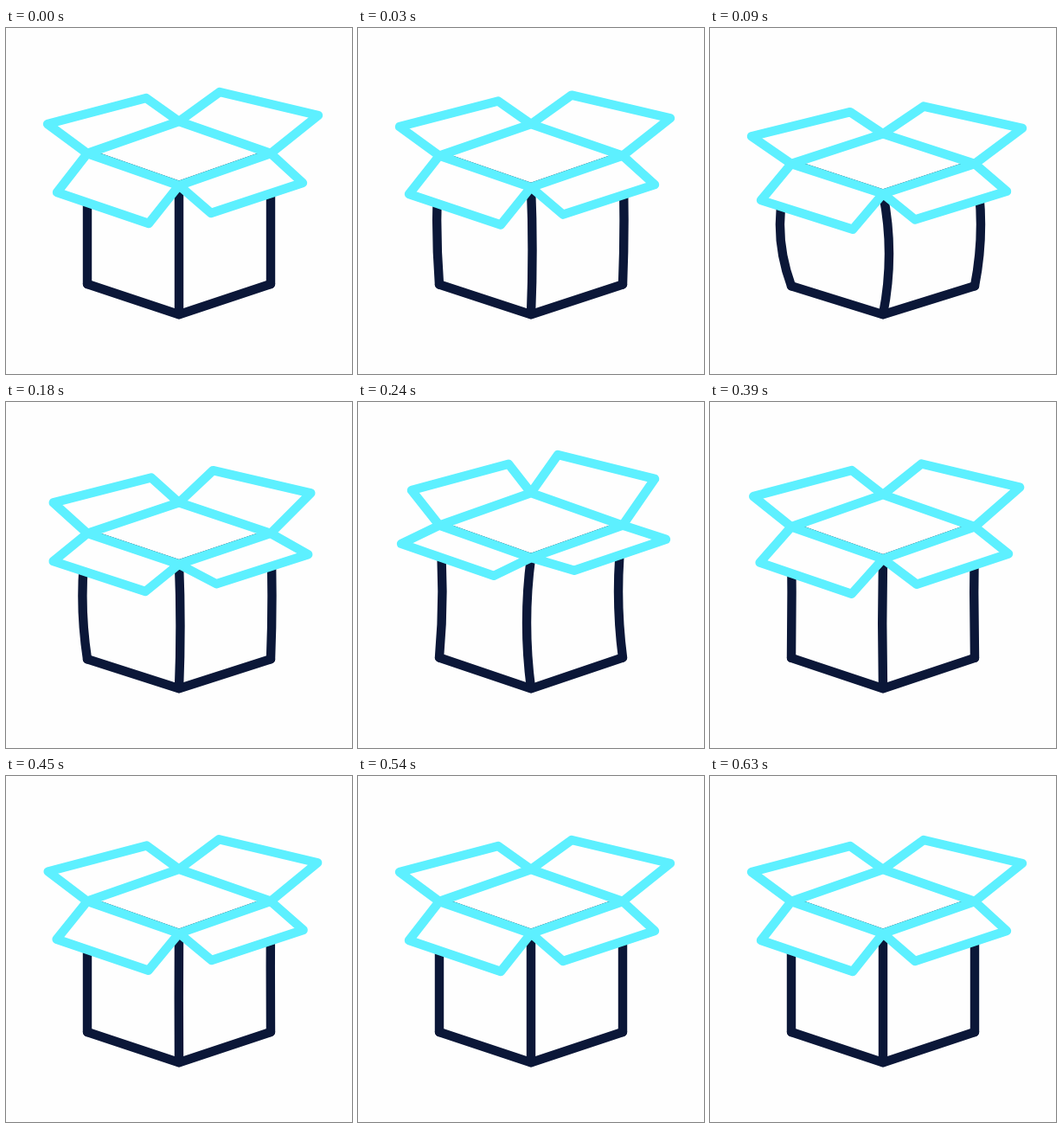
An HTML page without scripts that plays this animation: 400x400 px, repeating every 0.69 s.

```html
<!DOCTYPE html>
<html lang="en">
<head>
<meta charset="utf-8">
<title>Bouncing box</title>
<style>
  @property --height { syntax: "<number>"; inherits: false; initial-value: 1; }

  :root {
    --paper: #fefefe;
    --navy: #0b1738;
    --cyan: #5df0ff;
  }

  html, body { margin: 0; width: 100%; height: 100%; overflow: hidden; background: var(--paper); }
  svg { display: block; width: 100%; height: 100%; }

  /* The whole box is squashed and stretched on its lowest corner. */
  .box {
    fill: none;
    stroke-width: 10.4;
    stroke-linecap: round;
    stroke-linejoin: round;
    transform-origin: 200px 331px;
    transform: scaleY(var(--height));
    animation: bounce .69s infinite;
  }

  path { vector-effect: non-scaling-stroke; }
  .base { stroke: var(--navy); }

  .sides, .flaps { animation: bend .69s infinite; }

  /* The sides bow out while squashed and pinch in while stretched. */
  .sides {
    stroke: var(--navy);
    --rest: path("M94 145 Q94 220 94 296 M200 182 Q200 256 200 331 M306 145 Q306 220 306 296");
    --low:  path("M94 145 Q66 220 94 296 M200 182 Q215 256 200 331 M306 145 Q321 220 306 296");
    --high: path("M94 145 Q101 220 94 296 M200 182 Q190 256 200 331 M306 145 Q296 220 306 296");
  }

  /* Back left, back right, front left, front right; each stays on its hinge. */
  .flaps {
    fill: var(--paper);
    stroke: var(--cyan);
    --rest: path("M200 108 L162 81 48 111 94 145Z M200 108 L247 74 361 101 306 145Z M94 145 L59 190 165 226 200 182Z M306 145 L343 179 237 214 200 182Z");
    --low: var(--rest);
    --high: path("M200 108 L174 75 62 105 94 145Z M200 108 L231 64.5 343 92 306 145Z M94 145 L50 166 157 202.5 200 182Z M306 145 L356 161 250 196.5 200 182Z");
  }

  @keyframes bounce {
    0% { --height: 1; animation-timing-function: cubic-bezier(.37, 0, .4, 1); }
    17.4% { --height: .931; animation-timing-function: cubic-bezier(.37, 0, .63, 1); }
    39.1% { --height: 1.021; animation-timing-function: cubic-bezier(.2, .2, .2, 1); }
    78.3%, 100% { --height: 1; }
  }

  @keyframes bend {
    0% { d: var(--rest); animation-timing-function: cubic-bezier(.37, 0, .4, 1); }
    17.4% { d: var(--low); animation-timing-function: cubic-bezier(.37, 0, .63, 1); }
    35.5% { d: var(--high); animation-timing-function: cubic-bezier(.2, .2, .2, 1); }
    78.3%, 100% { d: var(--rest); }
  }
</style>
</head>
<body>
<svg viewBox="0 0 400 400">
  <g class="box">
    <path class="base" d="M94 296 L200 331.3 306 296 M94 145 L200 182 306 145"/>
    <path class="sides"/>
    <path class="flaps"/>
  </g>
</svg>
</body>
</html>
```
